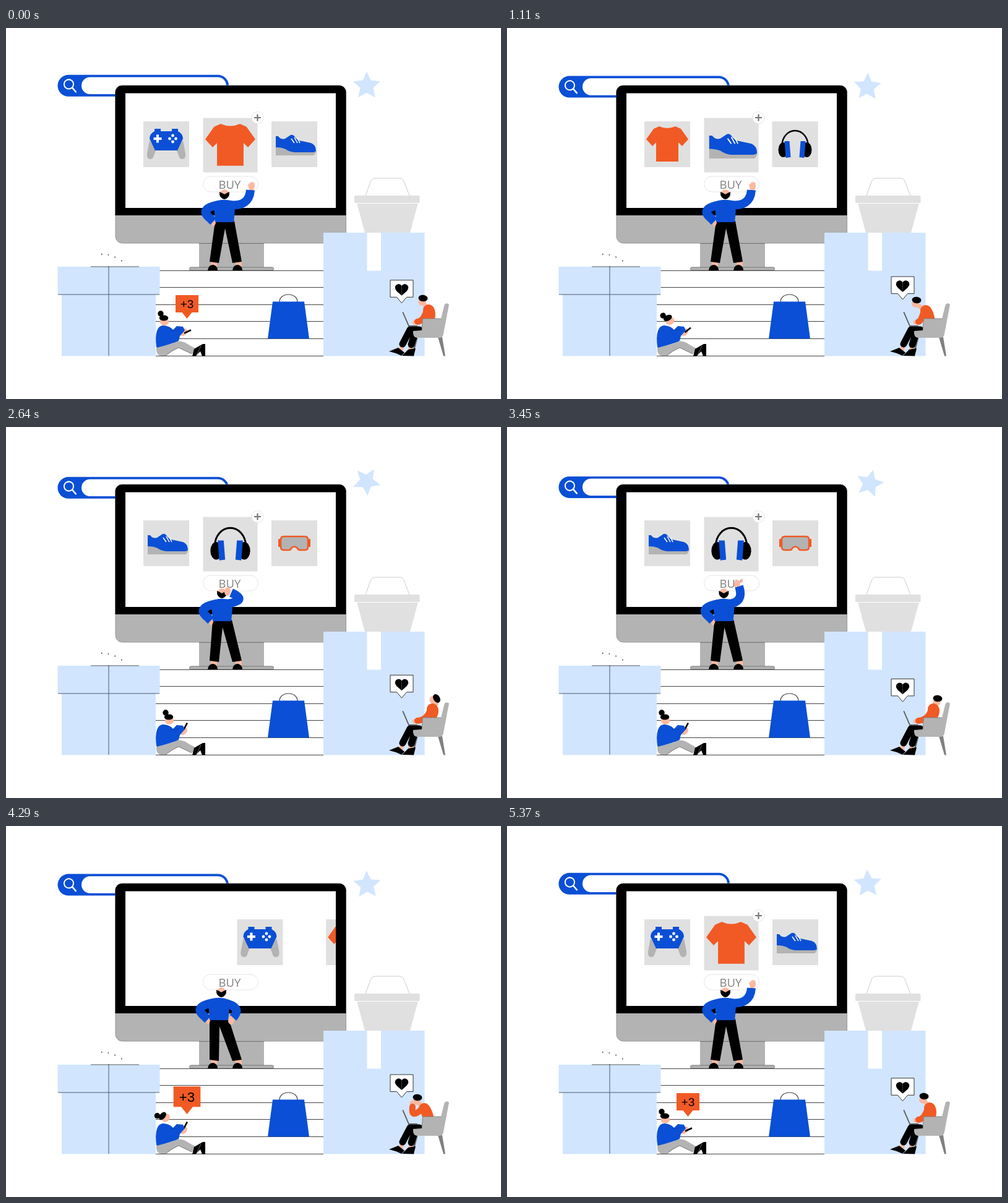
Write an HTML page with a canvas that moves like this. It is 800 by 600 pixels and loops after 5.4 s.

```html
<!DOCTYPE html>
<html lang="en">
<head>
<meta charset="utf-8">
<style>
html, body { margin: 0; width: 100%; height: 100%; overflow: hidden; background: #fff }
canvas { display: block }
</style>
</head>
<body>
<canvas id="stage" width="800" height="600"></canvas>
<script>
const g = document.getElementById('stage').getContext('2d');
const LOOP = 5400, TAU = Math.PI * 2;
const BLUE = '#0a4fd5', PALE = '#d1e5ff', RED = '#f15a24', GREY = '#b3b3b3',
  LIGHT = '#e0e0e0', INK = '#000', WHITE = '#fff', SKIN = '#fbb9a0';

const fill = (d, c) => { g.fillStyle = c; g.fill(new Path2D(d)); };
const line = (d, c, w = 1) => { g.strokeStyle = c; g.lineWidth = w; g.stroke(new Path2D(d)); };
const rect = (x, y, w, h, c, r = 0, edge) => {
  g.beginPath(); g.roundRect(x, y, w, h, r);
  g.fillStyle = c; g.fill();
  if (edge) { g.strokeStyle = edge; g.lineWidth = 1; g.stroke(); }
};
const oval = (x, y, rx, ry, c, turn = 0) => {
  g.beginPath(); g.ellipse(x, y, rx, ry, turn, 0, TAU);
  g.fillStyle = c; g.fill();
};
const at = (x, y, scale, turn, draw) => {
  g.save(); g.translate(x, y); g.rotate(turn); g.scale(scale, scale); draw(); g.restore();
};
const mirrored = draw => {
  draw();
  g.save(); g.scale(-1, 1); draw(); g.restore();
};
const text = (s, x, y, font, c) => {
  g.font = font; g.fillStyle = c; g.textAlign = 'center'; g.fillText(s, x, y);
};

// Easing
const clamp = p => Math.max(0, Math.min(1, p));
const ease = (t, a, b) => { const p = clamp((t - a) / (b - a)); return p * p * (3 - 2 * p); };
const hold = (t, a, b, c, d) => ease(t, a, b) - ease(t, c, d);  // rises a..b, falls c..d
const arc = w => 4 * w * (1 - w);
const overshoot = p => { const u = clamp(p) - 1; return 1 + 2.25 * u ** 3 + 1.25 * u * u; };

const icons = [
  function gamepad() {
    mirrored(() => fill('M27-6L31 15Q32 24 26 24Q21 24 20 18L16 8Z', GREY));
    mirrored(() => fill('M0-21H9V-25H19V-21Q27-17 27-9L18 10H-1V-21Z', BLUE));
    line('M-20.5-9H-7.5M-14-15.5V-2.5', WHITE, 4);
    for (let k = 0; k < 4; k++)
      oval(10.5 + 5 * Math.cos(k * TAU / 4), -9 + 5 * Math.sin(k * TAU / 4), 2.4, 2.4, WHITE);
  },
  () => fill('M-13-29Q0-23 13-29L22-25 34-8 24 3 18-3V28H-18V-3L-24 3-34-8-22-25Z', RED),
  function shoe() {
    fill('M-30 5V18H31Q36 15 35 9Z', GREY);
    fill('M-30-13H-26Q-22-7-15-9L-6-15Q-2-16 0-13Q4-6 13-5L27-2Q35 1 35 11Q33 13 28 13H0Q-9 12-14 8Q-20 5-30 5Z', BLUE);
    line('M-5-9L0-2M0-11L5-2M5-10L9-2', WHITE, 1.5);
  },
  function headphones() {
    line('M-21 2A21 24 0 0 1 21 2', INK, 2.5);
    mirrored(() => {
      oval(19, 9, 8, 12, INK);
      fill('M9-5L17-5 15 22 7 21Z', BLUE);
    });
  },
  function goggles() {
    mirrored(() => rect(20, -7, 6, 13, RED, 1));
    const d = 'M-17-11H17Q22-11 22-6V6Q22 11 17 11H9Q6 11 5 8Q0 3-5 8Q-6 11-9 11H-17Q-22 11-22 6V-6Q-22-11-17-11Z';
    fill(d, GREY); line(d, RED, 2.5);
  }
];

function plus(x, t) {
  const s = 1 - hold(t, 100, 250, 500, 900) - hold(t, 1400, 1550, 1700, 1970) - hold(t, 3600, 3750, 4700, 5100);
  if (s < 0.02) return;
  at(x + 44, 145, s, (s - 1) * 1.6, () => {
    rect(-9.5, -9.5, 19, 19, WHITE, 9.5, '#e6e6e6');
    line('M-5.5 0H5.5M0-5.5V5.5', '#777', 2.2);
  });
}

// Two steps to the left, then everything leaves and the first three items return.
function carousel(t) {
  g.save();
  g.beginPath(); g.rect(193, 106, 340, 185); g.clip();
  const fresh = t > 4000;
  let middle;
  icons.forEach((icon, i) => {
    const step = n => overshoot((t - 100 - 1300 * n - (i === 3 + n ? 217 : 0)) / 850);
    const d = i - 1 - (fresh ? 0 : step(0) + step(1)), a = Math.abs(d);
    const rest = fresh ? (1 - clamp((t - 4000 - i * 58) / 1000)) ** 3 : 0;
    const leave = clamp((t - 3600 - (i - 2) * 30) / 340) ** 2;
    const x = 362.5 + Math.sign(d) * (103.5 * a + 26 * Math.max(0, a - 1)) + 425 * (fresh ? rest : -leave);
    const grow = clamp(1 - a) * clamp(1 - 2.2 * rest);
    if (a < 0.5) middle = x;
    at(x, 188 + 1.5 * grow, 1 + 0.19 * grow, 0, () => {
      rect(-37, -37, 74, 74, LIGHT);
      icon();
    });
  });
  if (middle) plus(middle, t);
  g.restore();
}

function searchBar(t) {
  at(0, 2.5 * (1 - Math.cos(TAU * t / LOOP)), 1, 0, () => {
    rect(83.5, 75.8, 276.5, 35, BLUE, 17.5);
    rect(122, 79.5, 234, 27.5, WHITE, 13.7);
    line('M109 91A7.5 7.5 0 1 1 109 90.9', WHITE, 2);
    line('M107 96.5L113.5 104', WHITE, 2.6);
  });
}

function star(t) {
  const a = TAU * t / LOOP;
  const x = 583 - 1.6 * Math.sin(a) + 2 * Math.sin(2 * a);
  const y = 92.8 + 2.7 * Math.cos(a) - 2.1 * Math.cos(2 * a);
  at(x, y, 1, a, () => {
    g.beginPath();
    for (let k = 0; k < 10; k++) {
      const r = k % 2 ? 11 : 23.2, b = k * TAU / 10;
      g.lineTo(r * Math.sin(b), -r * Math.cos(b));
    }
    g.fillStyle = PALE; g.fill();
  });
}

function monitor(t) {
  rect(312, 347, 105, 42, GREY);
  line('M312 348.5H417', '#555');
  rect(296.5, 387, 136, 5, GREY, 2.5, '#777');
  rect(177, 93, 372.5, 255, GREY, 11, '#999');
  rect(176.5, 93, 373, 210, INK, [11, 11, 0, 0]);
  rect(193, 105.5, 340, 185.5, WHITE);
  carousel(t);
  rect(318.5, 240, 89, 25, WHITE, 12.5, '#e6e6e6');
  text('BUY', 361.5, 260, '18.5px "Open Sans", "Noto Sans", sans-serif', '#808080');
}

function scenery() {
  for (let k = 0; k < 6; k++)
    line(`M242 ${Math.floor(392 + 27.6 * k) + 0.5}H513`, '#444');
  rect(90, 431, 152, 99.5, PALE);
  rect(83.5, 386, 165, 45, PALE);
  line('M84 431H248M166 385V530', '#4a5a70');
  line('M137 386H215', '#333', 0.8);
  for (let k = 0; k < 4; k++) rect(154 + 10.7 * k, 365 + 1.2 * k * k, 1.4, 1.4, INK);

  rect(513, 331, 163.5, 199.5, PALE);
  rect(583.5, 331, 22.5, 61.5, WHITE);
  line('M581 271L589 249Q591 243 597 243H636Q641 243 643 248L652 271', '#ccc');
  fill('M567 283H666L653 331H580Z', LIGHT);
  rect(563, 271, 105.5, 12, LIGHT, 1.5);
  line('M567 283.5H666', WHITE);

  line('M442 443C442 427 471 427 471 443', '#444', 1.2);
  fill('M431 442.5H482L490 502.5H423Z', BLUE);
}

function shopper(t) {
  const think = hold(t, 1950, 2450, 3250, 3750), rest = hold(t, 3750, 4200, 4450, 5150);
  const lift = arc(think);
  const lean = -4 * think - 9 * rest;
  const wx = 395 - 31 * think - 28 * rest, wy = 262 + 6 * think + 48 * rest - 9 * lift;

  for (const x of [0, 40]) {
    fill(`M${331 + x} 376H${341 + x}V386H${331 + x}Z`, SKIN);
    fill(`M${326 + x} 392Q${327 + x} 383 ${335 + x} 383Q${342 + x} 385 ${342 + x} 392Z`, INK);
  }
  fill(`M${338 + lean} 312H${369 + lean}L381 378 366 380 ${354 + lean} 324 344 380 329 378Z`, INK);

  // Head, seen from behind
  at(353 - 4 * think - 5 * rest, 269, 1, 0, () => {
    oval(0, -1, 7, 6.8, SKIN);
    fill('M-8-4Q-5-3 0 0Q5-3 8-4Q9 6 0 8Q-9 6-8-4Z', INK);
  });

  oval(wx + 2 - 8 * think - 5 * rest, wy - 6 + 4 * think + 10 * rest, 5, 7, SKIN, 0.15);
  if (wy < 264) line(`M${wx + 4} ${wy - 6}L${wx + 5} ${wy - 12}M${wx - 1} ${wy - 5}L${wx - 3} ${wy - 9}`, SKIN, 3);
  at(lean, 0, 1, 0, () => {
    oval(336.5, 313, 3, 8, SKIN, 0.2);
    line('M344 286Q311 292 329 307L335 313', BLUE, 14);
    fill('M334 282Q352 274 369 281Q371 290 368 314H338Q338 300 334 282Z', BLUE);
  });
  line(`M${360 + lean} 286Q${393 - 10 * rest - 10 * lift} ${290 - 9 * think + 2 * rest} ${wx} ${wy}`, BLUE, 14);
}

function sitter(t) {
  const up = hold(t, 600, 1500, 2700, 3350), glance = hold(t, 3900, 4250, 4400, 4900);
  const tilt = hold(t, 700, 1700, 4400, 5200);
  fill('M301 518L309 523 305 529 297 524Z', SKIN);
  fill('M243 517L270 510Q277 504 288 508L307 519 300 527 279 517Q269 522 258 530H250Q242 529 243 517Z', GREY);
  line('M258 530Q268 521 279 517L300 527', '#666', 0.8);
  fill('M304 519L318 511 322 511V530.5H317L314 523 306 531H301Z', INK);
  line('M315 514L308 530', '#999', 0.7);
  at(255 + 8 * up - 2 * glance, 469, 1, -0.9 * glance - 0.5 * arc(up), () => {
    oval(1, 6, 7.3, 6, SKIN);
    oval(0, 0, 7.3, 4.6, INK);
    oval(-5, -7, 4.7, 4.7, INK);
  });
  oval(287, 492, 7, 5, SKIN, -0.8);
  at(293.5 - 3.5 * tilt, 491 - 7 * tilt, 1, -0.43 - 0.65 * tilt, () => line('M-6 0H6', INK, 2.6));
  fill('M243 516Q239 482 254 481Q265 482 270 488L276 482 286 483 289 489 281 498 279 506Q268 511 244 517Z', BLUE);
  line('M265 490L276 489 281 486', '#083c9f', 0.7);
}

function badge(t) {
  const seen = 1 - hold(t, 250, 550, 3900, 4250), pulse = hold(t, 3900, 4250, 4330, 4600);
  if (seen < 0.01) return;
  at(292.5, 470 - 4 * pulse, seen * (1 + 0.18 * pulse), 0, () => {
    fill('M-18.5-38H18.5V-10H8L0 0-8-10H-18.5Z', RED);
    text('+3', 0, -17, '19px "Liberation Sans", Arial, sans-serif', INK);
  });
}

function heart(t) {
  at(639.5, 404.5 + 3.3 * Math.cos(TAU * t / 1800), 1, 0, () => {
    const d = 'M-18.5 0H18.5V27.5H8L0 37-8 27.5H-18.5Z';
    fill(d, WHITE); line(d, '#333');
    mirrored(() => fill('M0 25L-8 18Q-13 12-9 8Q-4 4 0 9Z', INK));
  });
}

function worker(t) {
  const bow = hold(t, 500, 1000, 1950, 2500), back = hold(t, 2000, 2500, 3500, 4100);
  const gaze = hold(t, 2000, 2500, 2900, 3400), call = hold(t, 3700, 4200, 4400, 5100);
  const hx = 674 - 12 * bow + 22 * back - 9 * call, hy = 437 + 3 * bow + 2 * back + 2 * call;
  const sx = 683 - 6 * bow + 6 * back - 7 * call, sy = 456 + bow + call;
  const wx = 665 - 8 * call, wy = 475 - 21 * call;

  g.lineCap = g.lineJoin = 'round';
  line('M664 502L657 529', '#666', 2.5);
  fill('M698 500L707 530.5H710L705 500Z', '#808080');

  line('M641 512L638 522M655 512L653 523', SKIN, 7);
  line('M668 488L653 488 641 511M671 491L661 493 655 512', INK, 11);
  fill('M619 523L634 517 644 525 639 530 630 526Z', INK);
  fill('M640 530L650 520 662 518 659 530.5Z', INK);
  line('M641.5 460L651 482H664', '#555', 1.8);

  line(`M${hx} ${hy + 7}L${sx} ${sy}`, SKIN, 7);
  at(hx, hy, 1, 0.1 + 0.9 * gaze, () => {
    oval(-1, 6, 6.3, 6, SKIN);
    oval(0, 0, 7.5, 5.2, INK);
  });
  line(`M${sx} ${sy}Q${sx + 4} ${sy + 4} 683 474`, RED, 18);
  oval(wx - 4 + 4 * call, wy + 1 - 7 * call, 4.5, 4, SKIN);
  line(`M${sx - 3} ${sy}Q${sx - 8 - 14 * call} ${sy + 18} ${wx} ${wy}`, RED, 10);
  g.lineCap = 'butt'; g.lineJoin = 'miter';

  fill('M673 470H703L708.5 448Q711 443 716 447L706.5 497Q705 501 700 501H664Q657 500 658 490L672 489Z', GREY);
  line('M672 489L673.5 470H703', '#777', 0.8);
}

function frame(t) {
  g.fillStyle = WHITE; g.fillRect(0, 0, 800, 600);
  const parts = [searchBar, star, monitor, scenery, shopper, sitter, badge, heart, worker];
  for (const draw of parts) draw(t);
}

const start = performance.now();
(function tick() {
  frame((performance.now() - start) % LOOP);
  requestAnimationFrame(tick);
})();
</script>
</body>
</html>
```
